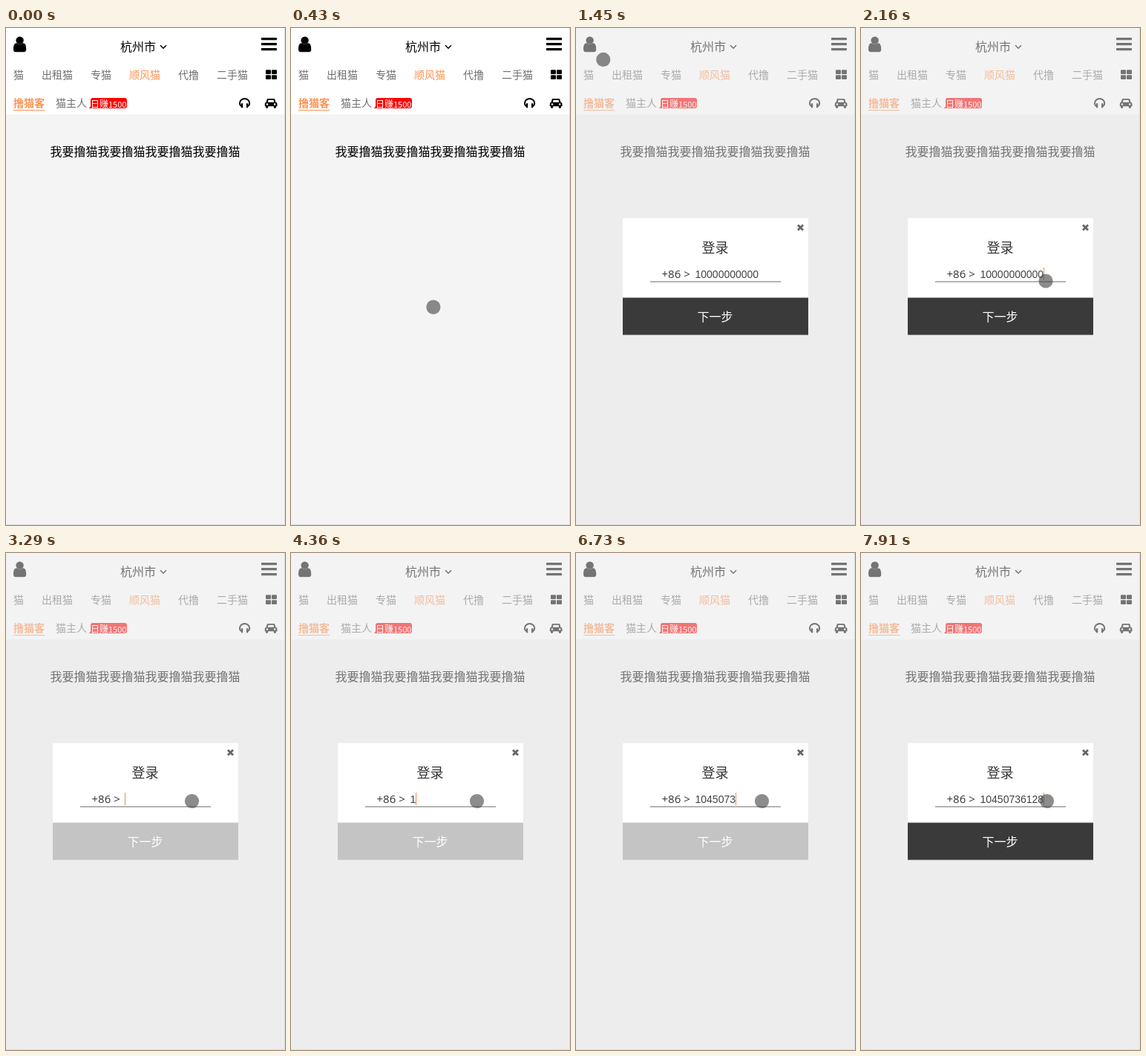
Write an HTML page that moves like this. It is 376 px wide and 668 px high and loops after 8000 ms.

```html
<!DOCTYPE html>
<html lang="zh-CN">
<head>
<meta charset="utf-8">
<style>
html, body { margin: 0; width: 100%; height: 100%; overflow: hidden; background: #f4f4f4; }
svg { display: block; width: 376px; height: 668px; }
text { font: 300 14px "Noto Sans CJK SC", "Noto Sans CJK", sans-serif; white-space: pre; }
.big { font-size: 16px; }
.title { font-size: 18px; fill: #333; }
.tag { font-size: 12px; fill: #fff; }
.tag tspan { font-size: 11px; }
.grey { fill: #707070; }
.hot { fill: #ff9455; }
.bold { font-weight: 700; }
.mid { text-anchor: middle; }
.num { font: 14px "Liberation Sans", Arial, sans-serif; fill: #444; }
.code { font: 15px "Open Sans", sans-serif; fill: #333; }
</style>
</head>
<body>
<svg viewBox="0 0 376 668">
  <rect width="376" height="668" fill="#f4f4f4"/>
  <rect width="376" height="116" fill="#fff"/>

  <g transform="translate(0 -.5)">
    <circle cx="18.6" cy="17.1" r="5.2"/>
    <path d="M14.4 20.7Q18.6 24 22.8 20.7C26.5 20.7 27.2 25 27.2 29Q27.2 32.8 24.3 32.8H12.8Q10 32.8 10 29C10 25 10.7 20.7 14.4 20.7Z"/>
  </g>
  <g id="bars"></g>
  <text class="big" x="154" y="31">杭州市</text>
  <path d="M208 23.3L212 27.3L216 23.3" fill="none" stroke="#000" stroke-width="1.5"/>

  <g id="tabs"></g>
  <g id="tiles"></g>

  <text class="hot bold" x="10" y="106">撸猫客</text>
  <rect class="hot" x="10" y="110" width="42" height="1"/>
  <text class="grey" x="67" y="106">猫主人</text>
  <path d="M117 94H160Q163 94 163 97V105Q163 108 160 108H111Q114 107 114 104V97Q114 94 117 94Z" fill="#f00"/>
  <text class="tag" x="114" y="107">日赚<tspan>1500</tspan></text>

  <path d="M317.5 105Q315 104 315 101A6.6 6 0 0 1 328.2 101Q328.2 104 325.7 105" fill="none" stroke="#000" stroke-width="2"/>
  <path d="M317 101.3H319.2V107.2H317ZM324 101.3H326.2V107.2H324Z"/>
  <path fill-rule="evenodd" d="M353 95H361Q362 95 362.4 96L363.5 99.7Q365.5 100 365.5 102V105.3H364V106.6Q364 108 362.4 108T360.8 106.6V105.3H353.2V106.6Q353.2 108 351.6 108T350 106.6V105.3H348.8V102Q348.8 100 350.6 99.7L351.6 96Q352 95 353 95ZM353.6 96.8L352.8 99.7H361.3L360.5 96.8ZM352 101.2A1.3 1.3 0 1 0 352 103.8A1.3 1.3 0 1 0 352 101.2ZM362.2 101.2A1.3 1.3 0 1 0 362.2 103.8A1.3 1.3 0 1 0 362.2 101.2Z"/>

  <text class="big" id="slogan" x="59.5" y="172"></text>

  <g id="dialog">
    <rect width="376" height="668" fill="#e8e8e8" opacity=".5"/>
    <rect x="63" y="255.5" width="250" height="107" fill="#fff"/>
    <path d="M299 264.8L306 271.8M306 264.8L299 271.8" stroke="#666" stroke-width="2.8"/>
    <text class="title mid" x="187.5" y="302">登录</text>
    <text class="code" x="115.5" y="336">+86 &gt;</text>
    <text class="num" id="phone" x="160.5" y="336"></text>
    <rect x="100" y="340" width="176" height="2" fill="#b4b4b4"/>
    <rect id="caret" y="322" width="1" height="17" fill="#f58a4a"/>
    <rect id="next" x="63" y="362.5" width="250" height="50"/>
    <text class="big mid" x="187.5" y="394" fill="#fff" style="font-weight:500">下一步</text>
  </g>

  <path d="M375.5 0V667.5H0" fill="none" stroke="#ddd"/>
  <circle id="dot" r="9.6" fill="#404040" fill-opacity=".6"/>
</svg>
<script>
const LOOP = 8000;
const OPEN = 1150, FOCUS = 2160, ERASE = 2660, REPEAT = 2960, EMPTY = 3290;
const SAVED = "10000000000";
const TYPED = "10450736128";
const DIGIT = 7.786;
const STEP = 64;
const $ = id => document.getElementById(id);

function add(parent, tag, attrs, text = "") {
  const el = document.createElementNS("http://www.w3.org/2000/svg", tag);
  for (const k in attrs) el.setAttribute(k, attrs[k]);
  el.textContent = text;
  $(parent).append(el);
}

for (let i = 0; i < 3; i++) {
  add("bars", "rect", { x: 344, y: 13 + i * 7, width: 21, height: 3.2, rx: 0.6 });
}
for (let i = 0; i < 4; i++) {
  add("tiles", "rect", { x: 350 + (i % 2) * 8, y: 56.3 + (i >> 1) * 6.9, width: 7, height: 5.8, rx: 1 });
}
let left = 10;
for (const label of ["猫", "出租猫", "专猫", "顺风猫", "代撸", "二手猫"]) {
  add("tabs", "text", { x: left, y: 68, class: label === "顺风猫" ? "hot" : "grey" }, label);
  left += label.length * 14 + 24;
}
$("slogan").textContent = "我要撸猫".repeat(4);

// one key, three bursts of three, one last key
const bursts = [0, 1, 2].flatMap(i => [0, 125, 380].map(d => 5280 + i * 1005 + d));
const keys = [4360, ...bursts, 7910];

const moves = [
  { from: 60, to: 830, x: 28.5, y: 25.5 },
  { from: 900, to: 1020, x: 24.5, y: 24.5 },
  { from: 1400, to: 1780, x: 245.3, y: 348 },
  { from: 2090, to: 2160, x: 249, y: 340 },
  { from: 2460, to: 2560, x: 250.5, y: 333.5 }
];

const smooth = u => u * u * (3 - 2 * u);

function pointer(t) {
  let x = 321.5, y = 652.5;
  for (const m of moves) {
    if (t < m.from) break;
    const steps = Math.round((m.to - m.from) / STEP) + 1;
    const done = Math.floor((t - m.from) / STEP) + 1;
    const u = t >= m.to ? 1 : smooth(Math.min(1, done / steps));
    x += (m.x - x) * u;
    y += (m.y - y) * u;
  }
  return [x, y];
}

function digits(t) {
  if (t < ERASE) return SAVED;
  if (t < REPEAT) return SAVED.slice(1);
  if (t < EMPTY) return SAVED.slice(0, Math.ceil(10 * (EMPTY - t) / (EMPTY - REPEAT)));
  return TYPED.slice(0, keys.filter(k => k <= t).length);
}

function caretOn(t) {
  if (t < FOCUS) return false;
  if (t >= REPEAT && t < EMPTY) return true;
  const last = Math.max(...[FOCUS, ERASE, EMPTY, ...keys].filter(k => k <= t));
  return Math.floor((t - last) / 500) % 2 === 0;
}

function draw(t) {
  $("dot").style.display = t < moves[0].from ? "none" : "";
  $("dot").setAttribute("transform", `translate(${pointer(t)})`);
  $("dialog").style.display = t < OPEN ? "none" : "";

  const value = digits(t);
  $("phone").textContent = value;
  $("caret").setAttribute("x", Math.round(160 + value.length * DIGIT));
  $("caret").style.display = caretOn(t) ? "" : "none";
  $("next").setAttribute("fill", value.length === 11 ? "#3a3a3a" : "#c4c4c4");
}

const t0 = performance.now();
function tick() {
  draw((performance.now() - t0) % LOOP);
  requestAnimationFrame(tick);
}
tick();
</script>
</body>
</html>
```
